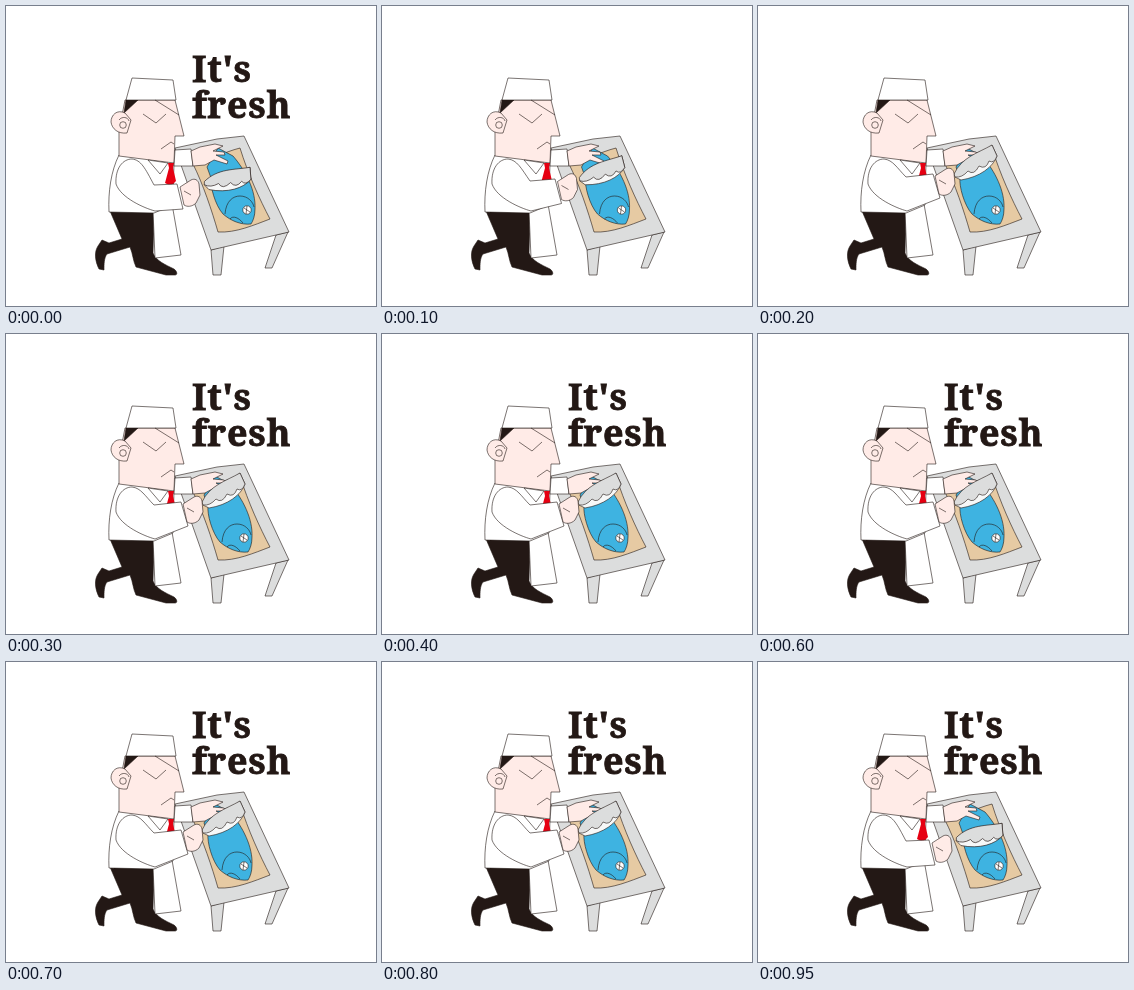
Recreate the animation shown at these times as an HTML page. Size 370x300 px, loop 1 s.

```html
<!DOCTYPE html>
<html lang="en">
<head>
<meta charset="utf-8">
<title>Fresh fish</title>
<style>
  html, body { margin: 0; width: 100%; height: 100%; overflow: hidden; background: #fff; }
  svg { display: block; width: 370px; height: 300px; }
  path, circle { stroke: #231815; stroke-width: .6; stroke-linejoin: round; fill: none; }
  .white { fill: #fff; }
  .skin { fill: #ffebe7; }
  .ink { fill: #231815; }
  .grey { fill: #dcdddd; }
  .edge { fill: #f7f8f8; }
  .board { fill: #e6caa3; }
  .blue { fill: #3eb3e1; }
  .red { fill: #e60012; stroke: none; }
  text {
    font: bold 36px "Noto Serif", "Liberation Serif", serif;
    letter-spacing: .7px; fill: #231815; stroke: #231815; stroke-width: .8;
  }
</style>
</head>
<body>
<svg viewBox="0 0 370 300">
  <g id="words">
    <text x="186" y="75.5">It's</text>
    <text x="186" y="111.5">fresh</text>
  </g>

  <g id="table">
    <path class="grey" d="M205 244L207 269L215 269L218 240Z"/>
    <path class="grey" d="M270 229L259 262L266 262L282 226Z"/>
    <path class="grey" d="M169 142L211 133L238 130L283 226L205 244Z"/>
    <path class="board" d="M187 158C202 155 218 146 234 142C242 168 254 194 264 213C248 219 230 227 212 226C206 205 197 178 187 158Z"/>
  </g>

  <g id="fish">
    <path class="blue" d="M198 161L209 142L224 150C237 165 247 185 246 203C246 210 244 215 242 218C232 219 222 215 214 208C206 199 201 180 202 172Z"/>
    <path d="M216 208C217 195 224 190 231 190C239 190 244 196 245 201M221 213C224 209 230 212 234 217"/>
    <circle class="white" cx="238" cy="204" r="4.2"/>
    <path d="M235 202L241 206M238 200L237 208"/>
  </g>

  <g id="man">
    <path class="ink" d="M104 205L148 207L147 247C150 255 160 259 168 263C171 265 172 269 169 269L160 269L130 261C127 255 127 248 124 241L101 248C98 252 98 258 98 264L93 263C89 255 88 246 92 240L96 234L103 237L116 233Z"/>
    <path class="white" d="M147 205L149 252L175 249L166 198Z"/>
    <path class="white" d="M113 149C105 165 102 186 103 206L148 207L167 199L168 155Z"/>
    <path class="skin" d="M119 94L169 94L178 130L169 130L168 157L113 150L113 125Z"/>
    <path class="ink" d="M120 94L132 94L118 107Z"/>
    <path class="skin" d="M119 107C111 103 105 109 105 116C106 123 112 128 121 127L125 114Z"/>
    <path d="M113 114C116 110 122 111 123 115"/>
    <circle cx="117" cy="119" r="3.3"/>
    <path class="white" d="M126 72L167 74L170 94L120 94Z"/>
    <path d="M149 94L173 109M137 108L150 117L160 108M155 143L165 136L168 138"/>
    <path class="red" d="M162 157L168 157L167 162L170 175L165 180L159 177L163 162Z"/>
    <path class="white" d="M142 154L154 168L162 157Z"/>
    <path class="white" d="M169 144L185 143L187 160L168 160Z"/>
    <path class="skin" d="M185 145L194 141L209 138L217 140L211 143L207 145L218 146L219 149L210 149L222 155L221 158L208 154L199 159L187 160Z"/>
  </g>

  <g id="knife">
    <path class="edge" d="M197 171L234 139L239 150C235 161 222 171 203 174Z"/>
    <path class="grey" d="M196 168C204 151 220 147 234 139L239 150Q236 158 231 155Q228 164 221 160Q216 170 210 165Q204 172 197 171Z"/>
  </g>
  <path id="sleeve" class="white"/>
  <g id="fist">
    <path class="skin" d="M177 170L188 163C192 161 195 163 196 167L197 178L193 186C189 190 184 190 181 188Z"/>
    <path d="M181 174L188 178"/>
  </g>
</svg>
<script>
  const $ = id => document.getElementById(id);
  const place = (id, value) => $(id).setAttribute("transform", value);
  const ease = x => {
    x = Math.min(1, Math.max(0, x));
    return x * x * (3 - 2 * x);
  };

  // 1 = blade on the fish, 0 = blade raised
  const press = t => 1 - ease(t / 200) + ease((t - 800) / 150);

  function draw(ms) {
    const t = Math.floor(ms % 1000 / 50) * 50;
    const p = press(t);
    place("fish", `translate(${3 * p} 0)`);
    place("knife", `translate(0 ${5 * p}) rotate(${20 * p} 190 176)`);
    place("fist", `translate(${-3 * p} ${11 * p})`);
    $("sleeve").setAttribute("d",
      `M110 178C109 162 117 153 126 153C135 154 139 162 148 ${171 + 8 * p}
       L${175 - 4 * p} ${168 + 10 * p}L${182 - 5 * p} ${192 + 11 * p}
       L149 205C138 202 115 192 110 178Z`);
    $("words").style.display = t >= 100 && t < 300 ? "none" : "";
  }

  const start = performance.now();
  function tick() {
    draw(performance.now() - start);
    requestAnimationFrame(tick);
  }
  tick();
</script>
</body>
</html>
```
